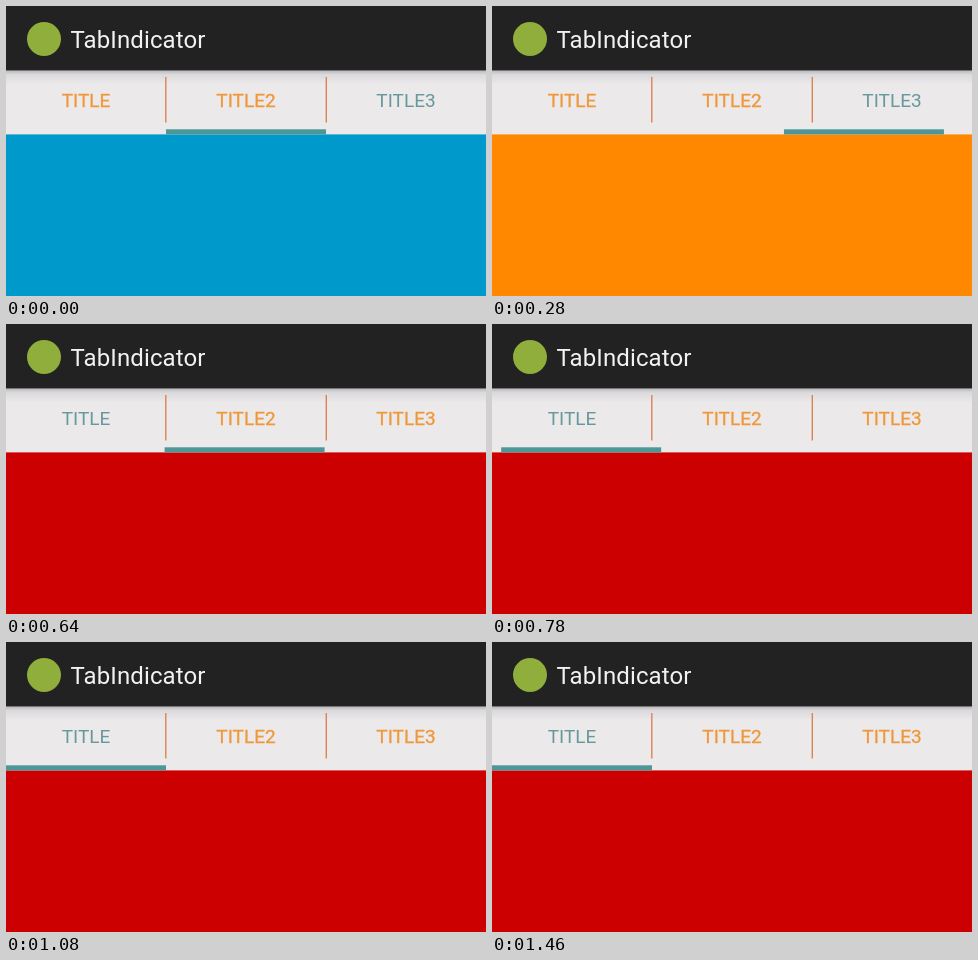
Recreate the animation shown at these times as an HTML page. Size 480 by 290 pixels, loop 1480 ms.

```html
<!DOCTYPE html>
<html lang="en">
<head>
<meta charset="utf-8">
<title>TabIndicator</title>
<style>
  html, body { margin: 0; width: 100%; height: 100%; overflow: hidden; }
  svg { display: block; width: 480px; height: 290px; font-family: Roboto, sans-serif; }
  .title { font-size: 24px; letter-spacing: .11px; fill: #f2f2f2; }
  .tab { font-size: 19px; text-anchor: middle; fill: #f0973a; stroke: #f0973a; stroke-width: .3px; }
  .tab.selected { fill: #66989c; stroke: none; }
</style>
</head>
<body>
<svg viewBox="0 0 480 290">
  <defs>
    <linearGradient id="shadow" x2="0" y2="1">
      <stop offset="0" stop-color="#b9b8ba"/>
      <stop offset=".3" stop-color="#dcdadc"/>
      <stop offset="1" stop-color="#ebe9ea"/>
    </linearGradient>
  </defs>
  <rect id="page" y="128" width="480" height="162"/>
  <rect y="64" width="480" height="64.4" fill="#ebe9ea"/>
  <rect y="64.5" width="480" height="14" fill="url(#shadow)"/>
  <rect width="480" height="64.5" fill="#222"/>
  <circle cx="38" cy="33" r="17" fill="#8fae3c"/>
  <text class="title" x="64.5" y="42">TabIndicator</text>
  <path d="M159.8 71V116.500M320.300 71V116.500" stroke="#dc8352" stroke-width="1.400"/>
  <text class="tab" x="80" y="101">TITLE</text>
  <text class="tab" x="240" y="101">TITLE2</text>
  <text class="tab" x="400" y="101">TITLE3</text>
  <rect id="indicator" y="123.3" width="160" height="5.100" fill="#4e9799"/>
</svg>
<script>
const LOOP = 1480, SLIDE = 360, TAB = 160;
const FIRST = 20, SECOND = 460; // slide starts
const LEAD = 20;                // labels switch just before the page does
const page = document.getElementById('page');
const indicator = document.getElementById('indicator');
const tabs = document.querySelectorAll('.tab');

// accelerate, then decelerate
function ease(time, start) {
  const p = Math.min(1, Math.max(0, (time - start) / SLIDE));
  return (1 - Math.cos(Math.PI * p)) / 2;
}

function draw(now) {
  const t = now % LOOP;
  const selected = t < SECOND - LEAD ? 2 : 0;
  tabs.forEach((tab, i) => tab.classList.toggle('selected', i === selected));
  page.setAttribute('fill', t < FIRST ? '#0099cc' : t < SECOND ? '#ff8800' : '#cc0000');
  indicator.setAttribute('x', TAB * (1 + ease(t, FIRST) - 2 * ease(t, SECOND)));
}

const origin = performance.now();
function frame() {
  draw(performance.now() - origin);
  requestAnimationFrame(frame);
}
frame();
</script>
</body>
</html>
```
